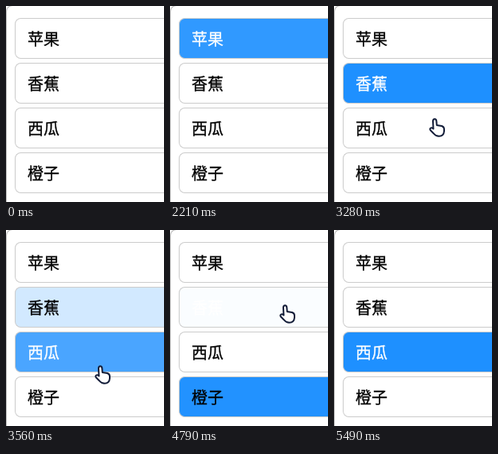
These frames come from a looping animation (198 by 245 pixels, 6.85 s). An HTML page:

```html
<!DOCTYPE html>
<html lang="zh-CN">
<head>
<meta charset="utf-8">
<style>
html, body { margin: 0; width: 100%; height: 100%; overflow: hidden; background: #fff; }
#list {
  position: absolute; inset: -1px 0 0 0; padding: 10px 0 0 10px;
  border: solid #bbb; border-width: 1px 0 0 1px; border-radius: 8px 0 0;
}
.item {
  margin: 5px 0; padding: 10px 0 10px 15px; box-sizing: border-box; height: 51px;
  border: 1px solid #ccc; border-right: 0; border-radius: 7.5px 0 0 7.5px;
  font: 20px/29px "Noto Sans CJK SC", sans-serif; -webkit-text-stroke: .3px;
}
svg { position: absolute; inset: 0; width: 100%; height: 100%; overflow: hidden; }
</style>
</head>
<body>
<div id="list">
  <div class="item">苹果</div>
  <div class="item">香蕉</div>
  <div class="item">西瓜</div>
  <div class="item">橙子</div>
</div>
<svg>
  <path id="hand" d="M5.5 13.5 5 4Q5 1.2 7.2 1.2 9.2 1.2 9.4 4L9.8 9 16 10Q19 11 19 14V16.5Q18.5 22.8 12.5 22.8 8.5 22.8 6 19.5L1.8 15.3Q.6 13.2 2.5 12.4 4 12 5.5 13.5Z"
    fill="#fff" stroke="#121c38" stroke-width="2" stroke-linejoin="round"/>
</svg>
<script>
const LOOP = 6850, FADE = 300;
const items = [...document.querySelectorAll('.item')];
const hand = document.getElementById('hand');

const clickTimes = [2015, 2710, 3410, 3985, 4780, 5200];
const clickedItem = n => n < 4 ? n : n - 3;

// Pointer moves: start, duration, x, y
const moves = [
  [90, 570, 123, 29], [850, 270, 135, 23], [1765, 65, 138, 34],
  [2060, 130, 202, 62], [2380, 250, 130, 108], [3060, 340, 115, 153],
  [3430, 320, 103, 198], [4090, 320, 132, 69], [4550, 210, 137, 93],
  [4850, 220, 140, 150], [5230, 220, 202, 170]
];

const clamp = v => Math.min(1, Math.max(0, v));
const smooth = v => v * v * (3 - 2 * v);

// CSS "ease": cubic-bezier(.25, .1, .25, 1), solved by bisection
function ease(x) {
  const bez = (s, a, b) => 3 * s * (1 - s) ** 2 * a + 3 * s * s * (1 - s) * b + s ** 3;
  let s = .5;
  for (let d = .25; d > 1e-5; d /= 2) s += bez(s, .25, .25) < x ? d : -d;
  return bez(s, .1, 1);
}

function drawItems(t) {
  const n = clickTimes.findLastIndex(c => c <= t);
  const now = clickedItem(n), before = n > 0 ? clickedItem(n - 1) : -1;
  const p = ease(clamp((t - clickTimes[n]) / FADE));
  items.forEach((el, i) => {
    const level = i === now ? p : i === before ? 1 - p : 0;
    el.style.background = `rgba(30, 144, 255, ${level.toFixed(4)})`;
    el.style.color = i === now ? '#fff' : '#000';
  });
}

function drawHand(t) {
  let x = 182, y = 250;
  for (const [start, time, toX, toY] of moves) {
    const f = smooth(clamp((t - start) / time));
    x += (toX - x) * f;
    y += (toY - y) * f;
  }
  hand.setAttribute('transform', `translate(${Math.round(x)} ${Math.round(y)})`);
}

const begin = performance.now();
function frame() {
  const t = (performance.now() - begin) % LOOP;
  drawItems(t);
  drawHand(t);
  requestAnimationFrame(frame);
}
frame();
</script>
</body>
</html>
```
